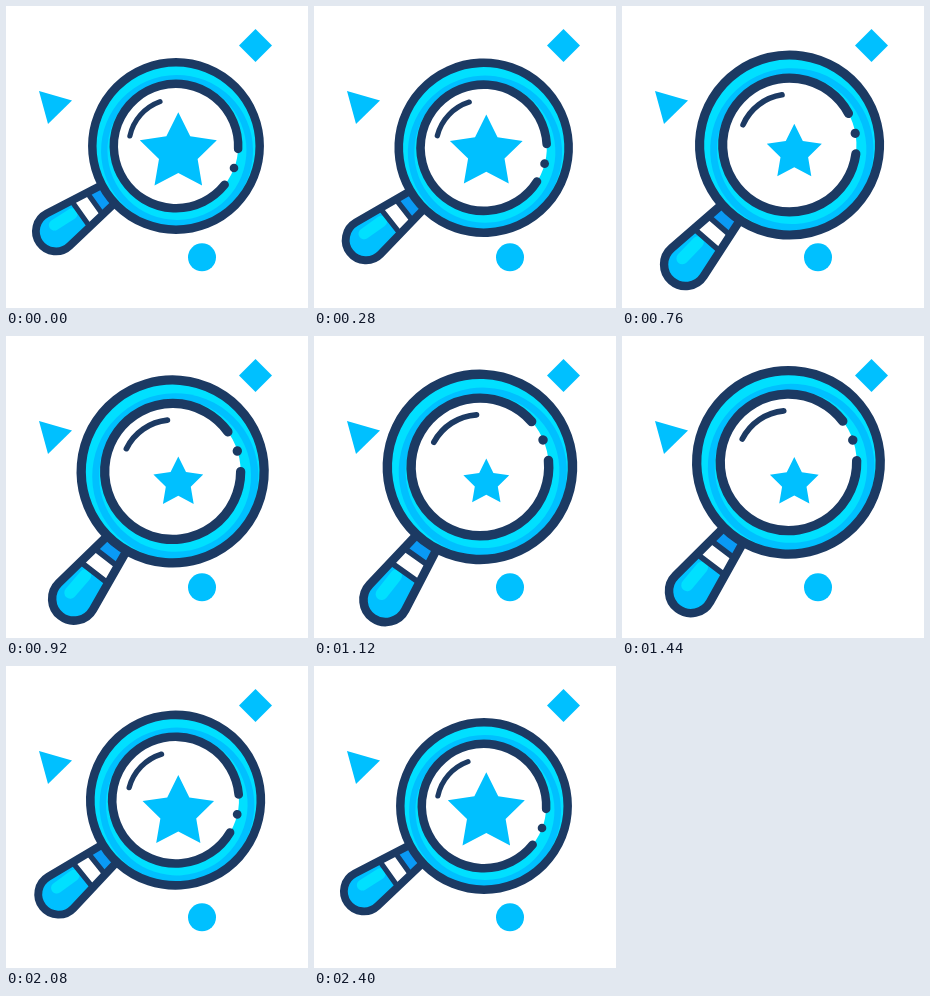
Recreate the animation shown at these times as an HTML page. Size 302 by 302 pixels, loop 2.44 s.

```html
<!DOCTYPE html>
<html>
<head>
<meta charset="utf-8">
<style>
html, body { margin: 0; height: 100%; overflow: hidden; background: #fff; }
svg { display: block; width: 100vw; height: 100vh; }
.line { fill: none; stroke: #1c3a63; stroke-width: 8.5; stroke-linecap: round; stroke-linejoin: round; }
.handle .line { stroke-width: 7.8; }
.handle .band { stroke-width: 5.2; }
#gleam { stroke-width: 5.2; }
.dot { fill: #1c3a63; }
.cyan { fill: #00c0ff; }
.glow { fill: #00e0ff; }
</style>
</head>
<body>
<svg viewBox="0 0 302 302">
  <defs>
    <path id="grip" d="M-11 82L-19.800 144.500A20 20 0 1 0 19.800 144.500L11 82Z"/>
    <clipPath id="inside"><use href="#grip"/></clipPath>
  </defs>
  <g class="cyan">
    <path d="M33 85L66 94.500L42 118Z"/>
    <path d="M249.500 23L266 39.500L249.500 56L233 39.500Z"/>
    <circle cx="196" cy="251.300" r="14"/>
  </g>
  <g id="glass">
    <g class="handle" transform="rotate(54.6)">
      <g clip-path="url(#inside)">
        <rect class="cyan" x="-30" y="80" width="60" height="100"/>
        <rect x="-30" y="80" width="60" height="20" fill="#0a9af5"/>
        <rect x="-30" y="100" width="60" height="17" fill="#fff"/>
        <path d="M-5 124L-6 145" stroke="#00e0ff" stroke-width="11" stroke-linecap="round"/>
        <path class="line band" d="M-30 99.500H30M-30 117H30"/>
      </g>
      <use href="#grip" class="line"/>
    </g>
    <g transform="rotate(78)">
      <circle class="glow" r="82"/>
      <circle class="cyan" cx="5" r="76"/>
      <circle class="glow" cx="4.500" r="69.500"/>
    </g>
    <circle r="62.200" fill="#fff"/>
    <circle r="83.700" class="line"/>
    <g id="rim">
      <path class="line" id="rimArc"/>
      <circle class="dot" cx="58" cy="22" r="4.300"/>
    </g>
    <path class="line" id="gleam"/>
  </g>
  <path class="cyan" id="star"/>
</svg>
<script>
const $ = id => document.getElementById(id);
const polar = (r, deg) => [r * Math.cos(deg * Math.PI / 180), r * Math.sin(deg * Math.PI / 180)];
const arc = (id, r, from, to) =>
  $(id).setAttribute('d', `M${polar(r, from)}A${r} ${r} 0 ${to - from > 180 ? 1 : 0} 1 ${polar(r, to)}`);
const move = (id, value) => $(id).setAttribute('transform', value);

arc('rimArc', 62.2, 38.5, 362.7);
arc('gleam', 47.2, 192.3, 250.2);
$('star').setAttribute('d', 'M' + Array.from({ length: 10 }, (_, i) =>
  polar(i % 2 ? 20.3 : 40.5, i * 36 - 90)).join('L') + 'Z');

const STEP = 40, LOOP = 2440, CYCLE = 2400;
const smooth = x => x * x * (3 - 2 * x);

// Vertical sway: down in the first quarter, up through the middle, then back.
function sway(p) {
  if (p < .25) return smooth(p * 4);
  if (p < .75) return 1 - 2 * smooth((p - .25) * 2);
  return smooth((p - .75) * 4) - 1;
}

function draw(now) {
  const p = Math.floor(now % LOOP / STEP) * STEP / CYCLE;
  const e = smooth(1 - Math.abs(1 - 2 * p));
  move('glass', `translate(143 ${154.5 + 7.2 * sway(p)}) rotate(${-19.5 * e}) scale(${1 + .108 * e}) translate(27 -14.5)`);
  move('rim', `rotate(${-25 * e})`);
  move('gleam', `rotate(${35.7 * e})`);
  move('star', `translate(172.3 146.7) scale(${1 - .41 * e})`);
  requestAnimationFrame(draw);
}
requestAnimationFrame(draw);
</script>
</body>
</html>
```
